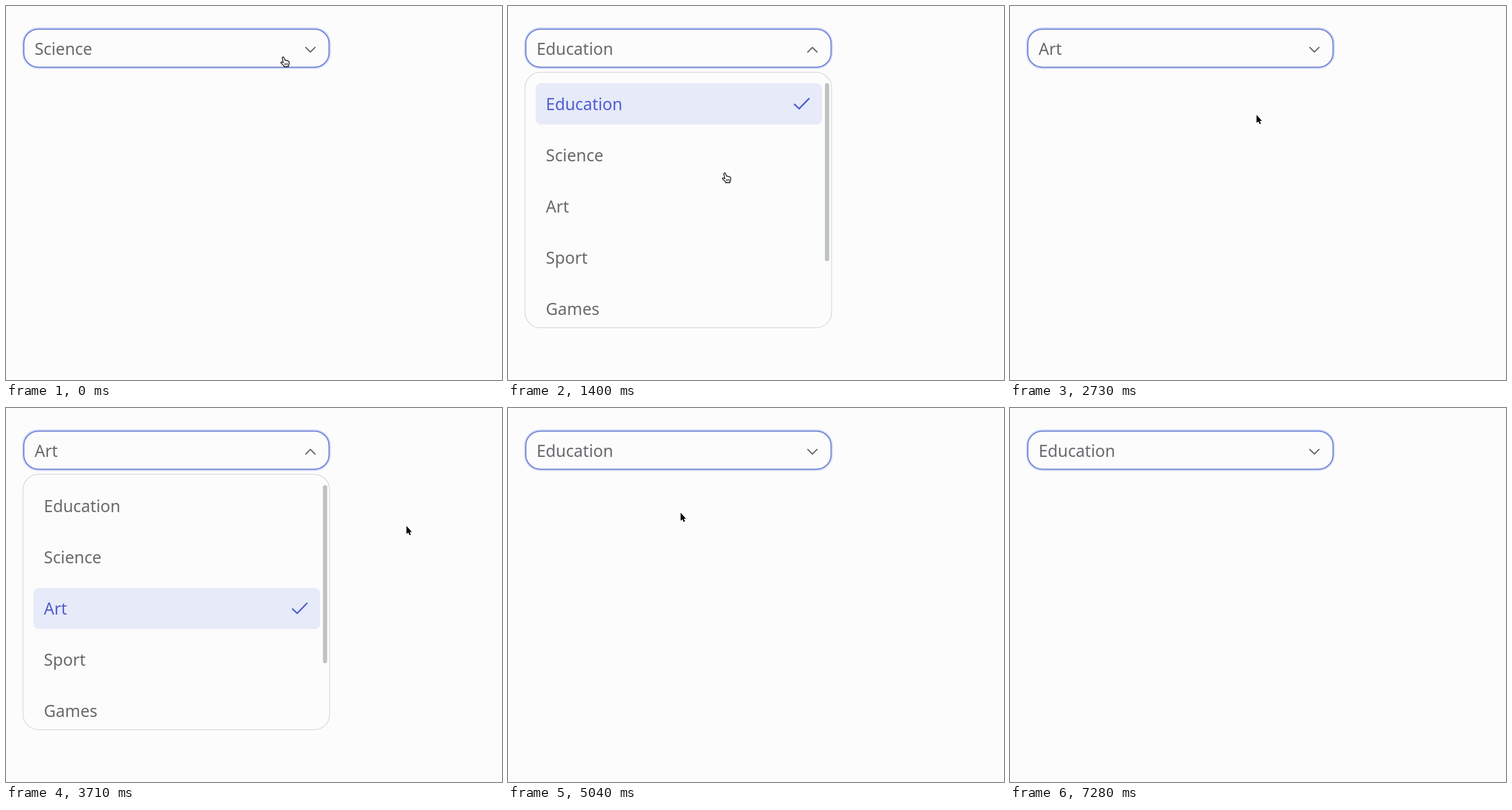
Recreate the animation shown at these times as an HTML page. Size 862 by 650 pixels, loop 7.49 s.

```html
<!DOCTYPE html>
<html lang="en">
<head>
<meta charset="utf-8">
<title>Select menu</title>
<style>
  html, body { margin: 0; width: 100%; height: 100%; overflow: hidden; background: #fcfcfc; }
  svg { display: block; width: 862px; height: 650px; }
  text { font: 28.5px "Noto Sans", "Open Sans", sans-serif; fill: #69696e; }
  .line { fill: none; stroke-linecap: round; stroke-linejoin: round; }
  .item.selected text { fill: #4f5dd2; }
  .item:not(.selected) > :not(text) { display: none; }
</style>
</head>
<body>
<svg viewBox="0 0 862 650">
  <defs>
    <clipPath id="viewport"><rect x="40" y="133.5" width="506" height="408"/></clipPath>
  </defs>

  <rect x="31" y="40.3" width="530.4" height="66" rx="25" fill="none" stroke="#ccd5fb" stroke-width="6"/>
  <rect x="31" y="40.3" width="530.4" height="66" rx="25" fill="#fcfcfc" stroke="#687dcc" stroke-width="1.8"/>
  <text id="value" x="49.7" y="84.6"></text>
  <path id="chevron" class="line" d="M-8 -4 L0 4 L8 -4" stroke="#69696e" stroke-width="2.3"/>

  <g id="menu">
    <rect x="29.5" y="115.2" width="533" height="444" rx="27" fill="#fcfcfc" stroke="#dcdcdf" stroke-width="1.5"/>
    <g clip-path="url(#viewport)"><g id="list"></g></g>
    <rect id="thumb" x="550.8" y="134" width="7.4" height="309.5" rx="3.7" fill="#bfc2c4"/>
  </g>

  <g id="cursor">
    <path id="arrow" d="M0 0 V14 L3.1 11.2 L5.2 16 L7.5 15 L5.5 10.4 H9.4Z" fill="#000" stroke="#fff" stroke-width="1.2" paint-order="stroke"/>
    <g id="hand" transform="translate(-4 0)">
      <path d="M3 1.6C3 0 5.2 -.4 5.9 1.1L8 6C9 5.3 10 5.7 10.4 6.5C11.4 6 12.4 6.3 12.8 7.2C13.8 6.8 14.8 7.3 14.9 8.4L15.1 12.4L13.7 15.2V17H6.4L5.6 15L.9 10.6C0 9.6 1.2 8.2 2.5 9L4.9 10.3Z" fill="#fff" stroke="#000" stroke-width="1.3" stroke-linejoin="round"/>
      <path d="M7.8 10.8V14.2M10 10.8V14.2M12.2 10.8V14.2" stroke="#000"/>
    </g>
  </g>
</svg>

<script>
const LOOP = 7490, STEP = 70, FADE = 140, TRAVEL = 280, ROW = 89.2;
const LABELS = ["Education", "Science", "Art", "Sport", "Games", "Music"];
const FIELD = { x: 481, y: 88.5 };
const POINTER_GONE = 6580;

// Each visit opens the menu, moves the pointer to x, y and closes with a pick or a click outside
const visits = [
  { open: 70, close: 560, x: 378, y: 166, pick: "Education" },
  { open: 980, close: 2590, x: 376, y: 290, pick: "Art" },
  { open: 2870, close: 3710, x: 696, y: 205 },
  { open: 4410, close: 4860, x: 300, y: 182, pick: "Education" },
  { open: 5320, close: 6370, x: 794, y: 217 }
];

const $ = id => document.getElementById(id);
const ramp = (t, start, duration) => Math.min(1, Math.max(0, (t - start) / duration));
const smooth = v => v * v * (3 - 2 * v);

$("list").innerHTML = LABELS.map((label, i) => `
  <g class="item" transform="translate(0 ${i * ROW})">
    <rect x="48" y="134.3" width="498" height="71.4" rx="9" fill="#e6eaf9"/>
    <text x="65.8" y="180.6">${label}</text>
    <path class="line" d="M498 171 L506 178.5 L523 161" stroke="#4f5dd2" stroke-width="2.6"/>
  </g>`).join("");
const items = [...document.querySelectorAll(".item")];

const openness = t => Math.max(...visits.map(({ open, close }) =>
  ramp(t, open, FADE) - ramp(t, close, FADE)));

// The pointer leaves the field once the menu is open and is back for the next opening
function pointer(t) {
  const index = visits.findLastIndex(visit => visit.open - TRAVEL <= t);
  const visit = visits[index], last = visits[index - 1] ?? FIELD;
  const back = smooth(ramp(t, visit.open - TRAVEL, TRAVEL));
  const away = smooth(ramp(t, visit.open + FADE, TRAVEL));
  const along = axis => last[axis] + (FIELD[axis] - last[axis]) * back + (visit[axis] - FIELD[axis]) * away;
  return [along("x"), along("y")];
}

// Scrolls down, rests, then springs back with a decaying speed
const scrollAt = t =>
  t < 2590 ? 103 * smooth(ramp(t, 1470, 350)) * Math.exp(-Math.max(0, t - 1960) / 124) : 0;

function draw(t) {
  const open = openness(t), scroll = scrollAt(t), [x, y] = pointer(t);
  const value = visits.findLast(({ close, pick }) => pick && close <= t)?.pick ?? "Science";

  $("value").textContent = value;
  $("chevron").setAttribute("transform", `translate(529 76) scale(1 ${1 - 2 * open})`);
  $("menu").setAttribute("opacity", open);
  $("list").setAttribute("transform", `translate(0 ${-scroll})`);
  $("thumb").setAttribute("y", 134 + scroll * 0.95);
  items.forEach((item, i) => item.classList.toggle("selected", LABELS[i] === value));

  const inColumn = x > 31 && x < 561;
  const clickable = inColumn && (y > 40 && y < 106 || open > 0.5 && y > 134 && y < 541);
  $("cursor").setAttribute("transform", `translate(${x} ${y})`);
  $("cursor").style.display = t < POINTER_GONE ? "" : "none";
  $("hand").style.display = clickable ? "" : "none";
  $("arrow").style.display = clickable ? "none" : "";
}

const startTime = performance.now();
function tick() {
  const t = (performance.now() - startTime) % LOOP;
  draw(Math.floor(t / STEP) * STEP);
  requestAnimationFrame(tick);
}
tick();
</script>
</body>
</html>
```
